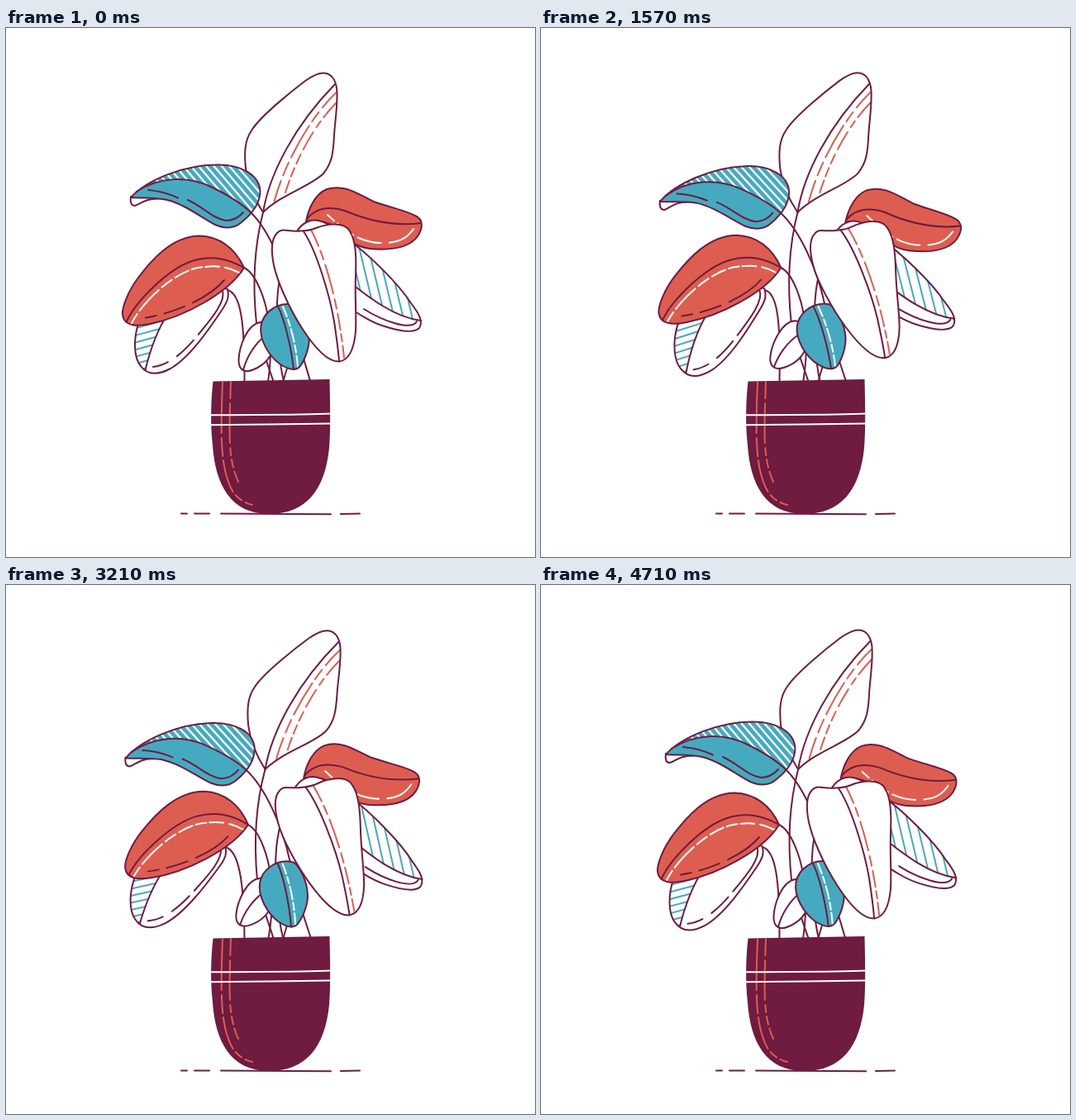
An HTML page with a canvas for the animation above (4780 ms loop, 640 by 640 pixels).

```html
<!DOCTYPE html>
<html lang="en">
<head>
<meta charset="utf-8">
<title>Swaying plant</title>
<style>
html, body { margin: 0; width: 100%; height: 100%; overflow: hidden; background: #fff; }
canvas { display: block; width: 100vmin; height: 100vmin; }
</style>
</head>
<body>
<canvas width="640" height="640"></canvas>
<script>
const canvas = document.querySelector('canvas');
const ctx = canvas.getContext('2d');
const WINE = '#701b40', RED = '#dd5e50', TEAL = '#45aabf', WHITE = '#fff';
const LOOP = 4780;
const KEY_TIMES = [0, 930, 1570, 2070, 2790, 3710];

const paths = new Map();
function shape(d) {
  if (!paths.has(d)) paths.set(d, new Path2D(d));
  return paths.get(d);
}

function fill(d, color) {
  ctx.fillStyle = color;
  ctx.fill(shape(d));
}

function line(d, color = WINE, dash = [], width = 2) {
  ctx.strokeStyle = color;
  ctx.lineWidth = width;
  // The trailing gap keeps a dash list from repeating.
  ctx.setLineDash(dash.length ? [...dash, 999] : []);
  ctx.stroke(shape(d));
}

function clipped(outline, draw) {
  ctx.save();
  ctx.clip(shape(outline));
  draw();
  ctx.restore();
}

// Parallel strokes: start point, vector of each stroke, step to the next.
function hatch(count, [x, y], [dx, dy], [stepX, stepY], color, width) {
  for (let i = 0; i < count; i++) {
    line(`M${x + i * stepX},${y + i * stepY} l${dx},${dy}`, color, [], width);
  }
}

// Smooth looping interpolation of key angles.
function sway(keys, time) {
  const n = keys.length;
  const at = i => KEY_TIMES[(i + n) % n] + LOOP * Math.floor(i / n);
  const val = i => keys[(i + n) % n];
  const slope = i => {
    const turns = (val(i) - val(i - 1)) * (val(i + 1) - val(i)) < 0;
    if (i % n === 0 && turns) return 0;
    return (val(i + 1) - val(i - 1)) / (at(i + 1) - at(i - 1));
  };
  let i = n - 1;
  while (at(i) > time) i--;
  const span = at(i + 1) - at(i), s = (time - at(i)) / span;
  const s2 = s * s, s3 = s2 * s;
  return (2 * s3 - 3 * s2 + 1) * val(i) + (3 * s2 - 2 * s3) * val(i + 1)
    + span * ((s3 - 2 * s2 + s) * slope(i) + (s3 - s2) * slope(i + 1));
}

function lowLeftLeaf(angle) {
  const leaf = 'M161,355 C154,375 154,398 163,409 C171,420 184,420 199,412 C222,399 246,364 262,340 C269,329 270,324 268,316 L230,300 L190,330Z';
  const side = 'M196,345 C184,364 174,390 168,414 L168,430 L140,430 L140,345Z';
  fill(leaf, WHITE);
  clipped(leaf, () => clipped(side, () =>
    hatch(7, [150, 365], [50, -13.5], [0, 8.6], TEAL, 2)));
  clipped(leaf, () => line('M196,345 C184,364 174,390 168,416'));
  line(leaf);
  line('M262,318 C266,330 250,350 235,368 C215,393 197,408 178,410', WINE, [62, 9, 28, 13, 30]);
}

function topLeaf() {
  const leaf = 'M311,223 C303,211 293,192 290,170 C288,150 289,136 297,124 C308,106 350,73 362,64 C372,57 378,54.5 384,54.5 C396,54.5 401,67 400.5,82 C400.5,100 398,113 397,130 C396,152 394,164 384,176 C368,192 335,200 311,223Z';
  line('M311,223 C301,262 298,310 303,357 C306,380 315,402 325,432');
  fill(leaf, WHITE);
  line('M399.5,78 C370,106 338,160 324.5,210', RED, [25, 7, 14, 6, 44, 7, 17, 7, 28]);
  line('M400,90 C375,115 352,155 338,199', RED, [24, 6, 9, 7, 24, 7, 12, 6, 11, 5, 16]);
  line('M311,223 C319,175 350,117 398,68');
  line(leaf);
}

function lowRightLeaf() {
  const leaf = 'M410,253 C440,274 476,311 490,333 C500,346 505,355 500,363 C492,371 470,365 455,360 C440,355 425,345 410,335Z';
  fill(leaf, WHITE);
  clipped(leaf, () => clipped('M410,303 C440,327 470,350 502,354 V240 H410Z', () =>
    hatch(7, [412.5, 250], [26.4, 110], [11, 0], TEAL, 2)));
  line('M410,303 C440,327 470,350 502,354');
  line('M433,340 C455,354 490,367 497,355');
  line(leaf);
}

function redRightLeaf() {
  const leaf = 'M363,234 C366,218 374,201 388,195 C410,188 427,202 445,210 C468,218 484,221 495,227 C506,232 504,243 498,252 C487,267 462,269 440,267 C420,264 410,254 398,240 C388,234 372,232 363,234Z';
  const hook = 'M352,246 C358,236 368,231 378,233 C383,234 386,235 390,238';
  line('M352,246 C342,262 332,290 329,318 C326,350 328,395 337,432');
  fill(leaf, RED);
  line('M389,226 C405,240 425,262 460,260 C478,259 486,253 493,243', WHITE, [11, 5, 24, 6, 29, 10, 45]);
  line('M364,231 C374,219 390,215 410,221 C440,234 470,240 502,236');
  line(leaf);
  fill(hook, WHITE);
  line(hook);
}

function tealLeaf() {
  const blade = 'M151,205 C170,184 215,165.5 255,165.5 C285,165 307,178 307.5,198 C307,214 295,227 285,235 C277,242 267,244 253,238 C237,230 218,214 195,208 C180,205 165,206 151,205Z';
  const fold = 'M151,204 C150,210 151,215 156,215 C163,213 168,206 185,206.5';
  const vein = 'M158,198 C185,180 220,178 250,193 C272,204 286,213 297,224';
  line('M297,224 C318,245 338,290 346,335 C351,375 362,405 370,434');
  fill(fold, WHITE);
  line(fold);
  fill(blade, TEAL);
  clipped(blade, () => clipped(vein + ' L330,224 V150 H150Z', () =>
    hatch(16, [160, 158], [62, 72], [9.3, 0], WHITE, 2.3)));
  line('M172,196 C185,197 196,200 208,205.5', WINE);
  line('M220,208 C238,216 249,230 266,233 C275,233 281,230 287,223', WINE);
  line(vein);
  line(blade);
}

function redLeftLeaf() {
  const leaf = 'M288,290 C277,266 258,252 234,251.5 C200,252 175,282 160,302 C148,318 140,338 141,347 C143,362 160,361 174,358 C215,350 270,320 288,290Z';
  line('M288,290 C303,297 314,330 317,350 C322,380 321,405 316,434');
  fill(leaf, RED);
  line('M152,357 C165,332 200,298 230,290.5 C250,287 265,287 282,296', WHITE, [13, 5, 34, 5, 15, 5, 18, 4, 13, 4, 17, 7, 25]);
  line('M169,350.5 C200,346 245,328 264,305', WINE, [13, 10, 26, 11, 60]);
  line('M146,355 C157,331 195,292 225,282 C250,274 270,280 288,290');
  line(leaf);
}

function smallWhiteLeaf() {
  const leaf = 'M308,356 C292,358 282,385 281.5,402 C281.5,414 289,418 300,413 C312,408 322,398 324,385 C326,370 320,356 308,356Z';
  fill(leaf, WHITE);
  line('M287,414 C291,398 301,382 314,372');
  line(leaf);
}

function smallTealLeaf() {
  const leaf = 'M340,334 C326,334 311,345 308.5,360 C306,377 318,397 332,407 C343,414 351,415 356,409 C363,399 368,383 366.5,372 C365,355 355,340 350,336 C347,334 344,334 340,334Z';
  fill(leaf, TEAL);
  line('M335,337 C345,360 351,385 353,410', WHITE, [13, 4, 8, 4, 16, 4, 9, 4, 14]);
  line('M329,337 C336,350 345,385 348,413');
  line(leaf);
}

function frontLeaf() {
  const leaf = 'M356,245.5 C340,247 334,241 328,248 C320,256 321,272 324,287 C328,306 342,338 358,363 C374,388 390,404 403,403.5 C414,402 421,390 423,367 C424,345 422,325 423,300 C424,275 423,257 416,246 C409,233 385,238 375,242 C368,245 362,245.5 356,245.5Z';
  fill(leaf, WHITE);
  line('M369,244 C388,280 403,340 409,399', RED, [22, 6, 11, 7, 36, 7, 12, 6, 20, 5, 9, 5, 15]);
  line('M360,246 C376,270 392,325 397,355 C400,375 402,390 403,403');
  line(leaf);
}

// Back to front; keys are clockwise angles around the pivot.
const leaves = [
  { draw: topLeaf, pivot: [318, 440], keys: [0, -.005, -.0025, .003, .012, .0085] },
  { draw: lowRightLeaf, pivot: [350, 470], keys: [0, -.011, -.0147, -.0147, -.003, .027] },
  { draw: redRightLeaf, pivot: [325, 500], keys: [0, .0145, .02, .02, .002, -.02] },
  { draw: tealLeaf, pivot: [302, 422], keys: [0, -.0165, -.033, -.041, -.037, -.02] },
  { draw: lowLeftLeaf, pivot: [255, 262], keys: [0, -.036, -.045, -.02, .02, .06], stem: true },
  { draw: redLeftLeaf, pivot: [290, 435], keys: [0, .008, .016, .022, .033, .031] },
  { draw: smallWhiteLeaf, pivot: [328, 350], keys: [0, .06, .083, .09, .08, .038] },
  { draw: smallTealLeaf, pivot: [330, 325], keys: [0, -.045, -.035, -.01, .02, .042] },
  { draw: frontLeaf, pivot: [345, 205], keys: [0, -.038, -.067, -.081, -.078, -.043] }
];

// This stem bends between its moving leaf and a fixed root.
function bendingStem(angle) {
  const shift = -60 * angle;
  ctx.setLineDash([]);
  ctx.strokeStyle = WINE;
  ctx.lineWidth = 2;
  ctx.beginPath();
  ctx.moveTo(268 + shift, 317);
  ctx.bezierCurveTo(284 + shift, 321, 289 + shift / 3, 356, 288.5, 430);
  ctx.stroke();
}

function pot() {
  fill('M250.5,427.5 L391.5,425 C392,450 393,485 391,508 C386,558 364,588 318,588 C272,588 253,552 250,505 C247,478 248,450 250.5,427.5Z', WINE);
  line('M262,428 C260,480 259,520 268,546 C274,566 284,573 298,577', RED, [62, 6, 22, 5, 40, 5, 10, 5, 12]);
  line('M272,428 C270,490 268,520 281,549', RED, [20, 6, 48, 6, 9, 5, 10, 5, 14]);
  line('M247,468.3 C290,467.5 350,468.5 394,466.5', WHITE);
  line('M247,480.3 C290,480 350,479 394,478.5', WHITE);
  line('M212,587.5 H219 M228,587.5 H246 M260,587.5 L393,588.2 M405,588 L428,587.5');
}

function render(time) {
  ctx.fillStyle = WHITE;
  ctx.fillRect(0, 0, 640, 640);
  ctx.lineCap = ctx.lineJoin = 'round';
  line('M346,395 C341,408 338,416 335,430');
  for (const { draw, pivot: [x, y], keys, stem } of leaves) {
    const angle = sway(keys, time);
    if (stem) bendingStem(angle);
    ctx.save();
    ctx.translate(x, y);
    ctx.rotate(angle);
    ctx.translate(-x, -y);
    draw();
    ctx.restore();
  }
  pot();
}

const start = performance.now();
function tick() {
  render((performance.now() - start) % LOOP);
  requestAnimationFrame(tick);
}
tick();
</script>
</body>
</html>
```
